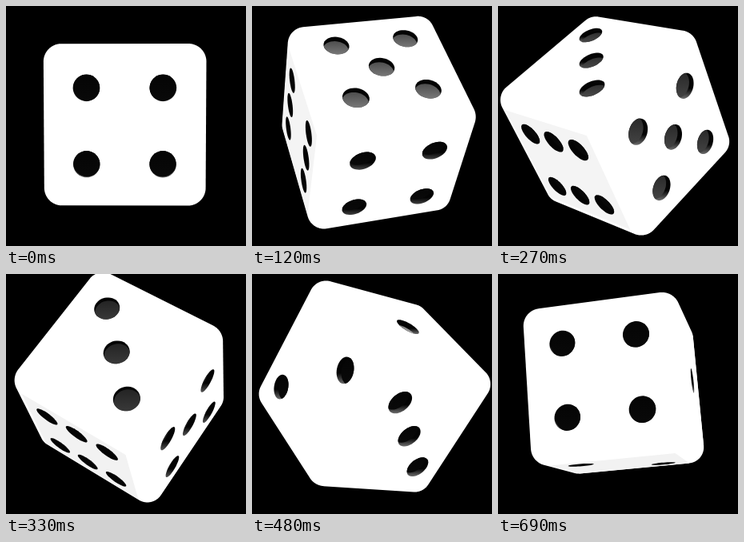
An HTML page with a canvas for the animation above (720 ms loop, 300 px wide and 300 px high).

```html
<!DOCTYPE html>
<html lang="en">
<head>
<meta charset="utf-8">
<title>Rolling die</title>
<style>
  html, body { margin: 0; width: 100%; height: 100%; overflow: hidden; background: #000; }
  canvas { display: block; }
</style>
</head>
<body>
<canvas id="stage" width="300" height="300"></canvas>
<script>
const ctx = document.getElementById('stage').getContext('2d');
const STEP = 30, STEPS = 24;
const FOCAL = 1036, DISTANCE = 11, ROUND = 0.22;
const SPREAD = 0.4615, PIP = 0.162, DEPTH = 0.075;
const KEY_LIGHT = [0.3, 0.5, 0.8], SIDE_LIGHT = [0.6, 0.7, 0];

// Orientation keys: step, then quaternion w, x, y, z (y points up)
const KEYS = [
  [0, 1, 0.03, -0.005, 0],
  [4, 0.9015, 0.4043, 0.1545, -0.0006],
  [9, 0.4721, 0.7726, 0.4221, -0.044],
  [13, -0.0336, 0.8707, 0.4859, -0.0703],
  [16, -0.413, 0.7503, 0.5154, -0.031],
  [20, -0.8228, 0.4562, 0.3366, -0.0412],
  [23, -0.991, 0.0863, 0.0929, -0.0479]
];

const CORNERS = [[-1, -1], [1, -1], [1, 1], [-1, 1]];
const FALLING = [[-1, 1], [1, -1]];
const MIDDLE = [[0, 0]];
// Axis, side, pips along the two following axes
const FACES = [
  [0, 1, MIDDLE],
  [0, -1, [...CORNERS, [0, -1], [0, 1]]],
  [1, 1, [...CORNERS, ...MIDDLE]],
  [1, -1, FALLING],
  [2, 1, CORNERS],
  [2, -1, [...FALLING, ...MIDDLE]]
];

const clamp = (v, low, high) => Math.min(high, Math.max(low, v));
const gray = v => `rgb(${v},${v},${v})`;
const dot = (a, b) => a[0] * b[0] + a[1] * b[1] + a[2] * b[2];
const cross = (a, b) => [
  a[1] * b[2] - a[2] * b[1], a[2] * b[0] - a[0] * b[2], a[0] * b[1] - a[1] * b[0]
];

// A full turn flips the sign of the quaternion
function keyAt(i) {
  const n = KEYS.length, turn = Math.floor(i / n);
  const [step, ...q] = KEYS[i - turn * n];
  return { step: step + turn * STEPS, q: q.map(v => turn % 2 ? -v : v) };
}

function orientation(step) {
  let i = KEYS.length - 1;
  while (KEYS[i][0] > step) i--;
  const [k0, k1, k2, k3] = [i - 1, i, i + 1, i + 2].map(keyAt);
  const span = k2.step - k1.step, u = (step - k1.step) / span;
  const q = k1.q.map((p, j) => {
    const m1 = (k2.q[j] - k0.q[j]) / (k2.step - k0.step) * span;
    const m2 = (k3.q[j] - p) / (k3.step - k1.step) * span;
    const d = k2.q[j] - p;
    return p + u * (m1 + u * (3 * d - 2 * m1 - m2 + u * (m1 + m2 - 2 * d)));
  });
  const size = Math.hypot(...q);
  return q.map(v => v / size);
}

function rotate([w, ...axis], v) {
  const t = cross(axis, v), s = cross(axis, t.map((c, i) => c + w * v[i]));
  return v.map((c, i) => c + 2 * s[i]);
}

function project([x, y, z]) {
  const scale = FOCAL / (DISTANCE - z);
  return [149.4 + x * scale, 144 - y * scale, scale];
}

function fillShape(points, style) {
  ctx.beginPath();
  for (const [x, y] of points) ctx.lineTo(x, y);
  ctx.closePath();
  ctx.fillStyle = style;
  ctx.fill();
}

// Vertical gradient over the height of a shape
function fade(points, from, top, bottom) {
  const ys = points.map(p => p[1]);
  const gradient = ctx.createLinearGradient(0, Math.min(...ys), 0, Math.max(...ys));
  gradient.addColorStop(from, gray(top));
  gradient.addColorStop(1, gray(bottom));
  return gradient;
}

const around = (count, make) =>
  Array.from({ length: count }, (_, i) => make(i / count * 2 * Math.PI));

// Outline of the eight corner spheres
function drawBody(q) {
  const inner = 1 - ROUND, spheres = [];
  for (const z of [-inner, inner])
    for (const [x, y] of CORNERS)
      spheres.push(project(rotate(q, [x * inner, y * inner, z])));
  const outline = around(360, angle => {
    const dx = Math.cos(angle), dy = Math.sin(angle);
    const reach = ([x, y, s]) => x * dx + y * dy + s * ROUND;
    const [x, y, s] = spheres.reduce((a, b) => reach(b) > reach(a) ? b : a);
    return [x + dx * s * ROUND, y + dy * s * ROUND];
  });
  fillShape(outline, '#fff');
}

function drawFace(q, [axis, side, pips]) {
  const point = (u, v, height = 1) => {
    const p = [];
    p[axis] = side * height;
    p[(axis + 1) % 3] = u;
    p[(axis + 2) % 3] = v;
    return project(rotate(q, p));
  };
  const local = [0, 0, 0];
  local[axis] = side;
  const normal = rotate(q, local);
  if (normal[2] * DISTANCE < 1) return;

  const light = dot(normal, KEY_LIGHT);
  const flat = CORNERS.map(([u, v]) => point(u * (1 - ROUND), v * (1 - ROUND)));
  fillShape(flat, gray(clamp(255 + 90 * light, 242, 255)));

  const wallGray = clamp(300 * light, 4, 110);
  const floorGray = Math.max(8, 220 * dot(normal, SIDE_LIGHT));
  for (const [u, v] of pips) {
    const ring = height => around(40, angle => point(
      u * SPREAD + PIP * Math.cos(angle), v * SPREAD + PIP * Math.sin(angle), height));
    const rim = ring(1), floor = ring(1 - DEPTH);
    ctx.save();
    fillShape(rim, fade(rim, 0.6, 4, wallGray));
    ctx.clip();
    fillShape(floor, fade(floor, 0, floorGray * 0.65, floorGray * 1.1));
    ctx.restore();
  }
}

function draw() {
  const q = orientation(Math.floor(performance.now() / STEP) % STEPS);
  ctx.fillStyle = '#000';
  ctx.fillRect(0, 0, 300, 300);
  drawBody(q);
  for (const face of FACES) drawFace(q, face);
  requestAnimationFrame(draw);
}
draw();
</script>
</body>
</html>
```
